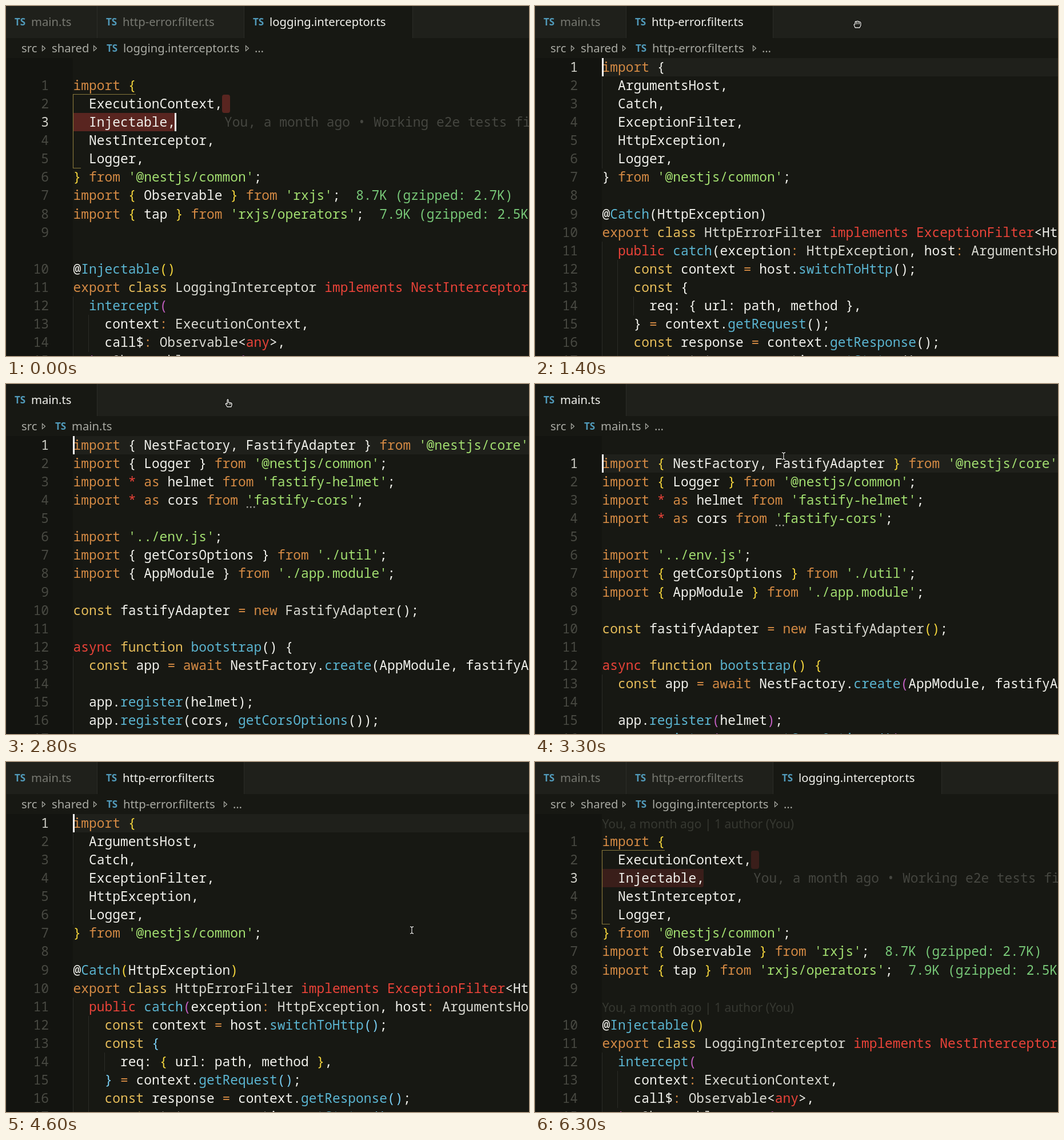
These frames come from a looping animation (915 px wide and 612 px high, 6.4 s). An HTML page with a canvas:

```html
<!DOCTYPE html>
<html lang="en">
<head>
<meta charset="utf-8">
<title>Editor tabs</title>
<style>
  html, body { margin: 0; width: 100%; height: 100%; overflow: hidden; background: #171813; }
  canvas { display: block; width: 915px; height: 612px; }
</style>
</head>
<body>
<canvas id="stage" width="915" height="612"></canvas>
<script>
const LOOP = 6400, STEP = 100, W = 915, H = 612;
const ctx = document.getElementById('stage').getContext('2d');
const MONO = '22.9px "Noto Sans Mono", "DejaVu Sans Mono", monospace';
const UI = '"Noto Sans", "Open Sans", sans-serif';
const CHAR = 13.74, LEFT = 117.5, TOP = 91, ROW = 32.07, BASE = 24;

const C = {
  bg: '#171813', gutter: '#131410', bar: '#1f201b', edge: '#2b2c27', line: '#1f201b',
  text: '#f1f1ec', type: '#dcdcd5', dim: '#777871', crumb: '#a9aaa3', num: '#484942', numOn: '#d2d2ca',
  orange: '#d48a44', gold: '#e6bd5a', red: '#ea4339', cyan: '#5bb5d1', green: '#a2de70',
  size: '#78c878', blame: '#454640', lens: '#565750', ts: '#519aba', scope: '#85763a',
  mouse: '#e8e8e4', hand: '#20211d'
};
const PAIRS = ['#f3d43c', '#c45fc3', '#79cdf2'];

const WORDS = {};
const paint = (color, words) => words.split(' ').forEach(w => WORDS[w] = color);
paint(C.orange, 'import from export as new await');
paint(C.gold, 'class const function');
paint(C.red, 'implements public async any Date');

const ONE = 'You, a month ago | 1 author (You)';
const MANY = 'You, a month ago | 2 authors (You and others)';

const FILES = {
  main: {
    name: 'main.ts', tab: [0, 159], gaps: [1], lens: [MANY], current: 1,
    code: `import { NestFactory, FastifyAdapter } from '@nestjs/core';
import { Logger } from '@nestjs/common';
import * as helmet from 'fastify-helmet';
import * as cors from 'fastify-cors';

import '../env.js';
import { getCorsOptions } from './util';
import { AppModule } from './app.module';

const fastifyAdapter = new FastifyAdapter();

async function bootstrap() {
  const app = await NestFactory.create(AppModule, fastifyAdapter);
  
  app.register(helmet);
  app.register(cors, getCorsOptions());
  `
  },
  http: {
    name: 'http-error.filter.ts', tab: [160, 416], gaps: [1, 9], lens: [ONE, ONE], current: 1,
    code: `import {
  ArgumentsHost,
  Catch,
  ExceptionFilter,
  HttpException,
  Logger,
} from '@nestjs/common';

@Catch(HttpException)
export class HttpErrorFilter implements ExceptionFilter<HttpException> {
  public catch(exception: HttpException, host: ArgumentsHost) {
    const context = host.switchToHttp();
    const {
      req: { url: path, method },
    } = context.getRequest();
    const response = context.getResponse();
    const status = exception.getStatus();`
  },
  log: {
    name: 'logging.interceptor.ts', tab: [417, 711], gaps: [1, 10], lens: [ONE, ONE], current: 3,
    code: `import {
  ExecutionContext,
  Injectable,
  NestInterceptor,
  Logger,
} from '@nestjs/common';
import { Observable } from 'rxjs';
import { tap } from 'rxjs/operators';

@Injectable()
export class LoggingInterceptor implements NestInterceptor {
  intercept(
    context: ExecutionContext,
    call$: Observable<any>,
  ): Observable<any> {
    const now = Date.now();
    const {`
  }
};
for (const key in FILES) FILES[key].lines = FILES[key].code.split('\n');
const ORDER = ['main', 'http', 'log'];

// time, active tab, shown file, lens rows open, decorations, blame, breadcrumb dots
const STATES = [
  [0, 'log', 'log', 1, 1, 1, 1],
  [1300, 'http', 'http', 0, 0, 0, 1],
  [1600, 'http', 'http', 0, 1, 1, 1],
  [1700, 'http', 'http', 1, 1, 1, 1],
  [2800, 'main', 'main', 0, 0, 0, 0],
  [3100, 'main', 'main', 1, 1, 0, 1],
  [4100, 'http', 'main', 1, 1, 0, 0],
  [4200, 'http', 'http', 0, 0, 0, 0],
  [4400, 'http', 'http', 0, 1, 0, 1],
  [4700, 'http', 'http', 1, 1, 1, 1],
  [5000, 'log', 'http', 1, 1, 1, 0],
  [5100, 'log', 'log', 0, 0, 0, 0],
  [5400, 'log', 'log', 0, 1, 1, 1],
  [5700, 'log', 'log', 1, 1, 1, 1]
];
const CARET = [[0, 1], [500, 0], [1000, 1], [1800, 0], [2300, 1], [3500, 0], [4000, 1], [4700, 0], [5100, 1], [5700, 0]];
// start, length of fade, end
const FADES = [[2300, 400, 2800], [3400, 400, 4200], [6100, 400, 6400]];
const MOUSE = [
  [0, 0, 0, ''], [400, 732, 38, 'grab'], [500, 706, 35, 'grab'], [600, 688, 34, 'point'],
  [1300, 640, 33, 'grab'], [1400, 564, 32, 'grab'], [1500, 535, 32, 'grab'], [1700, 520, 32, 'grab'],
  [2100, 430, 33, 'grab'], [2200, 390, 34, 'point'],
  [2900, 418, 110, 'beam'], [3100, 431, 122, 'beam'], [3200, 435, 126, 'beam'],
  [3500, 470, 156, 'beam'], [3600, 560, 228, 'beam'], [3700, 640, 280, 'beam'], [3800, 670, 294, 'beam'],
  [4600, 710, 294, 'beam'], [4700, 775, 294, 'beam'], [4800, 825, 294, 'beam'], [4900, 843, 294, 'beam'],
  [5700, 868, 200, 'beam'], [5800, 896, 100, 'beam'], [5900, 0, 0, '']
];

const at = (table, t) => table.filter(row => row[0] <= t).pop();

function box(x, y, w, h, color) {
  ctx.fillStyle = color;
  ctx.fillRect(x, y, w, h);
}
function text(str, x, y, color, font) {
  ctx.font = font;
  ctx.fillStyle = color;
  ctx.fillText(str, x, y);
}
function path(d, stroke, width, fill) {
  const p = new Path2D(d);
  if (fill) { ctx.fillStyle = fill; ctx.fill(p); }
  ctx.strokeStyle = stroke;
  ctx.lineWidth = width;
  ctx.stroke(p);
}
const label = (str, x, y, color) => text(str, x, y, color, '20.3px ' + UI);
const badge = (x, y) => text('TS', x, y, C.ts, 'bold 17px ' + UI);
const chevron = x => path(`M${x - 2.5} 69.5 L${x + 2.5} 74 L${x - 2.5} 78.5 Z`, C.crumb, 1.2);

function drawTabs(active, hover) {
  box(0, 0, W, 56, C.bar);
  for (const key of ORDER.slice(0, ORDER.indexOf(active) + 1)) {
    const { name, tab: [x, end] } = FILES[key];
    const on = key === active;
    if (on) box(x, 0, end - x, 56, C.bg);
    box(end, 0, 1, 56, C.edge);
    badge(x + 15, 34);
    label(name, x + 44, 35, on ? C.text : C.dim);
    if (on && hover) path(`M${end - 28} 23 l10 10 m0 -10 l-10 10`, C.text, 2.6);
  }
}

function drawCrumbs(active, dots) {
  const [start, end] = { main: [86, 184], http: [176, 372], log: [176, 410] }[active];
  label('src', 27, 81, C.crumb);
  chevron(66);
  if (active !== 'main') {
    label('shared', 80, 81, C.crumb);
    chevron(156);
  }
  badge(start, 80);
  label(FILES[active].name, start + 29, 81, C.crumb);
  if (dots) {
    chevron(end + 12);
    label('…', end + 25, 81, C.crumb);
  }
}

function wordColor(word, prev, next) {
  if (WORDS[word]) return WORDS[word];
  if (prev === 'implements') return C.red;
  if (next === '(' && (prev === '@' || /^[a-z]/.test(word))) return C.cyan;
  return /^[A-Z]/.test(word) && [':', 'new', 'class'].includes(prev) ? C.type : C.text;
}

function drawLine(line, y, pairs, depth) {
  let prev = '';
  for (const m of line.matchAll(/'[^']*'|[\w$]+|\s+|./g)) {
    const s = m[0], rest = line.slice(m.index + s.length);
    if (!s.trim()) continue;
    let color = C.text;
    if (s[0] === "'") color = C.green;
    else if (/[\w$]/.test(s)) color = wordColor(s, prev, rest[0]);
    else if (s === '*') color = C.red;
    else if (s === '=' || (s === ':' && !/^ ({|path)/.test(rest))) color = C.orange;
    else if ('({'.includes(s)) { if (pairs) color = PAIRS[depth % 3]; depth++; }
    else if (')}'.includes(s)) { depth--; if (pairs) color = PAIRS[depth % 3]; }
    text(s, LEFT + m.index * CHAR, y, color, MONO);
    prev = s;
  }
  return depth;
}

function drawEditor(key, open, extra, blame, t) {
  const file = FILES[key], isLog = key === 'log';
  const top = n => Math.round(TOP + ROW * (n - 1 + (open ? file.gaps.filter(g => g <= n).length : 0)));
  const currentTop = top(file.current);
  box(0, TOP, 117, H - TOP, C.gutter);
  if (isLog) {
    ctx.fillStyle = t >= 6200 ? '#3a1e1a' : '#592520';
    ctx.beginPath();
    ctx.roundRect(378, top(2), 14, 32, 4);
    ctx.roundRect(118, currentTop, 177, 32, [0, 0, 4, 0]);
    ctx.fill();
  } else {
    box(117, currentTop, W - 117, 32, C.line);
  }

  let depth = 0;
  file.lines.forEach((line, i) => {
    const n = i + 1, y = top(n), base = y + BASE;
    const scoped = isLog && extra && n < 6;
    const indent = line.search(/\S|$/);
    for (let k = 0; k < indent && !scoped; k += 2) box(Math.floor(LEFT + k * CHAR), y, 1, 33, C.edge);
    ctx.textAlign = 'right';
    text(n, 75, base, n === file.current ? C.numOn : C.num, MONO);
    ctx.textAlign = 'left';
    depth = drawLine(line, base, extra, depth);
    if (blame && n === file.current)
      text('You, a month ago • Working e2e tests finally pass', LEFT + line.length * CHAR + 86, base, C.blame, MONO);
  });

  if (isLog && extra) {
    path(`M227 ${top(2) - 0.5} H117.5 V${top(6) + 0.5} H131`, C.scope, 1.2);
    [['8.7K (gzipped: 2.7K)', 7], ['7.9K (gzipped: 2.5K)', 8]].forEach(([s, n]) =>
      text(s, LEFT + (file.lines[n - 1].length + 2) * CHAR, top(n) + BASE, C.size, MONO));
  }
  if (key === 'main')
    for (let k = 0; k < 3; k++) box(421 + k * 6, top(4) + 27, 2.5, 2.5, '#a0a09a');

  const fade = FADES.find(f => t >= f[0] && t < f[2]);
  if (open && fade) {
    ctx.globalAlpha = Math.min(1, (t - fade[0]) / fade[1]);
    file.gaps.forEach((n, i) => text(file.lens[i], LEFT, top(n) - 7, C.lens, '21.05px ' + UI));
    ctx.globalAlpha = 1;
  }
  if (at(CARET, t)[1])
    box(isLog ? 295 : 117, currentTop, 3, 32, '#ffffff');
}

function drawMouse(x, y, kind) {
  if (!kind) return;
  ctx.save();
  ctx.translate(x, y);
  ctx.lineJoin = 'round';
  if (kind === 'beam') {
    const beam = 'M-3 -6 Q0 -6 0 -4 Q0 -6 3 -6 M0 -4 V4 M-3 6 Q0 6 0 4 Q0 6 3 6';
    path(beam, '#000', 3);
    path(beam, C.mouse, 1.3);
  } else {
    const [hand, fingers] = kind === 'grab'
      ? ['M-4 6 L-6 1 Q-6 -1 -4 0 V-4 Q-3 -6 -2 -4 Q-1 -7 1 -5 Q3 -6 3 -4 Q6 -5 6 -2 V2 L4 6 Z', 'M-1.5 -4 V0 M1 -4 V0 M3.5 -3 V0']
      : ['M-3 6 L-6 1 Q-5 -1 -3 1 V-6 Q-2 -8 -1 -6 V-2 L4 -1 Q6 0 5 3 L4 6 Z', 'M1 0 V2 M3 0 V2'];
    path(hand, '#000', 3);
    path(hand, C.mouse, 1.3, C.hand);
    path(fingers, C.mouse, 1);
  }
  ctx.restore();
}

function draw(t) {
  const [, active, file, open, extra, blame, dots] = at(STATES, t);
  const [, mx, my, kind] = at(MOUSE, t);
  box(0, 0, W, H, C.bg);
  drawEditor(file, open, extra, blame, t);
  drawTabs(active, kind === 'point' && active !== 'main');
  drawCrumbs(active, dots);
  box(0, 0, 1, H, '#22231e');
  drawMouse(mx, my, kind);
}

const start = performance.now();
let shown = -1;
function tick() {
  const elapsed = Math.max(0, performance.now() - start) % LOOP;
  const t = Math.floor(elapsed / STEP) * STEP;
  if (t !== shown) draw(shown = t);
  requestAnimationFrame(tick);
}
tick();
</script>
</body>
</html>
```
